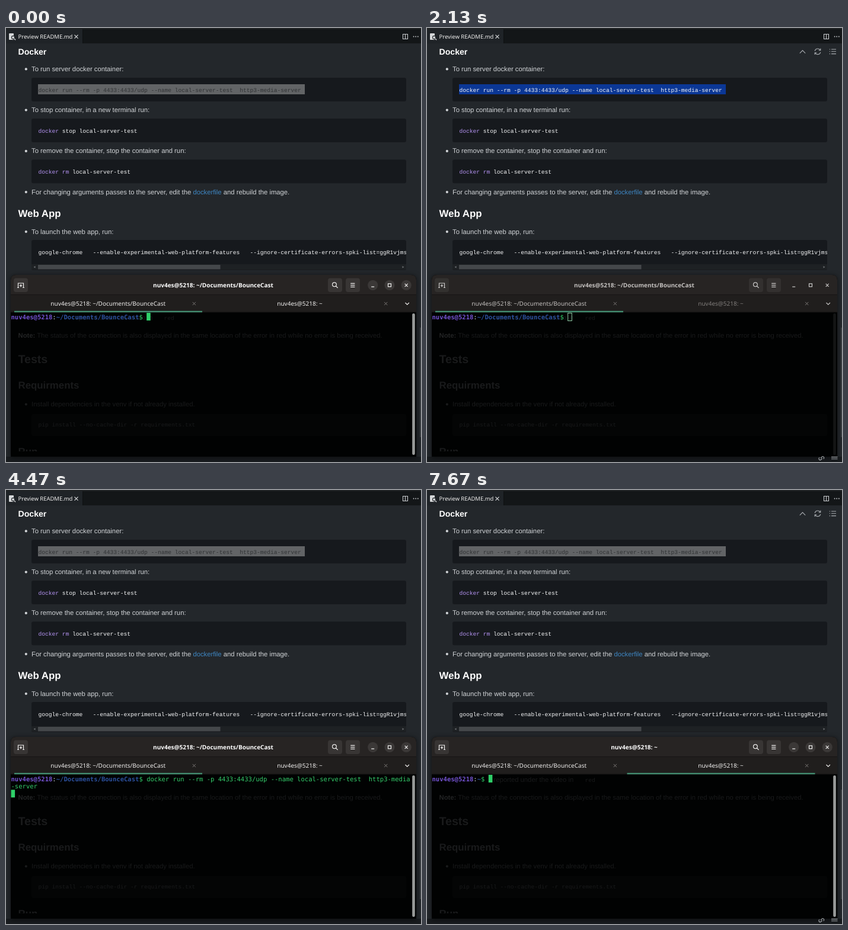
These frames come from a looping animation (700x733 px, 8 s). An HTML page:

```html
<!DOCTYPE html>
<html lang="en">
<head>
<meta charset="utf-8">
<title>Terminal over README preview</title>
<style>
  html, body { margin: 0; width: 100%; height: 100%; overflow: hidden; background: #23272b; }
  svg { display: block; width: 700px; height: 733px; }
  text { white-space: pre; text-rendering: geometricPrecision; }
  .body { font: 11.27px "Liberation Sans", Arial, sans-serif; fill: #d0d3d6; }
  .head { font: bold 16.85px "Liberation Sans", Arial, sans-serif; fill: #fff; }
  .code { font: 9.6px "Liberation Mono", monospace; fill: #f4f5f6; }
  .term { font: 10.55px "DejaVu Sans Mono", monospace; fill: #35cf6c; }
  .ui { font: 10.02px "Noto Sans", "Open Sans", sans-serif; fill: #efeeed; }
  .line { fill: none; stroke: #a9adb1; stroke-width: 1.1; }
  .ghost text { fill: #191a1b; }
</style>
</head>
<body>
<svg id="stage" viewBox="0 0 700 733"></svg>
<script>
const LOOP = 8000;
const USER = 'nuv4es@5218';
const PATH = '~/Documents/BounceCast';
const CODE_X = 54.5, CODE_W = 5.761;
const TERM_X = 8.5, TERM_W = 6.351;
const RUN = 'docker run --rm -p 4433:4433/udp --name local-server-test  http3-media-server';
const PURPLE = '#b392f0', BLUE = '#79b8ff', GREEN = '#2fd069';

const stage = document.getElementById('stage');

function el(tag, attrs, parent = stage, content) {
  const node = document.createElementNS('http://www.w3.org/2000/svg', tag);
  for (const key in attrs) node.setAttribute(key, attrs[key]);
  if (content !== undefined) node.textContent = content;
  parent.appendChild(node);
  return node;
}
const group = (parent, attrs = {}) => el('g', attrs, parent);
const rect = (x, y, width, height, fill, parent, rx = 0) =>
  el('rect', { x, y, width, height, fill, rx }, parent);
const text = (x, y, cls, content, parent, attrs = {}) =>
  el('text', { x, y, class: cls, ...attrs }, parent, content);
const path = (d, parent, attrs = {}) => el('path', { d, class: 'line', ...attrs }, parent);

// A text made of [content, colour, weight] runs.
function runs(x, y, cls, parts, parent) {
  const node = text(x, y, cls, '', parent);
  for (const [content, fill, weight] of parts) {
    const span = el('tspan', {}, node, content);
    if (fill) span.style.fill = fill;
    if (weight) span.style.fontWeight = weight;
  }
  return node;
}
const show = (node, on) => node.setAttribute('visibility', on ? 'visible' : 'hidden');
const within = (t, spans) => spans.some(([from, to]) => t >= from && t < to);

// Editor page
const defs = el('defs', {});
const clipRect = (id, x, y, w, h) => rect(x, y, w, h, '#000', el('clipPath', { id }, defs));
clipRect('codeClip', 43, 358, 632, 52);
clipRect('termClip', 8, 480, 682, 235);

const page = group(stage);
rect(0, 0, 700, 733, '#23272b', page);
rect(0, 0, 700, 26, '#131618', page);
rect(0, 2, 129, 24, '#1f2327', page);
rect(0, 0, 700, 2, '#1f2224', page);
rect(129, 2, 1, 24, '#0e1011', page);

rect(5, 9, 8, 11, '#d5d7d9', page, 1);
el('circle', { cx: 12, cy: 16, r: 2.6, fill: '#d5d7d9', stroke: '#25292d', 'stroke-width': 1.1 }, page);
path('M13.8 17.9L16 20.2', page, { style: 'stroke:#e5e7e9;stroke-width:1.3' });
text(20.5, 17.6, 'ui', 'Preview README.md', page, { style: 'font-size:9.45px' });
path('M115.5 11.6l6 6m0-6l-6 6', page, { style: 'stroke:#e0e2e4' });
path('M669.5 10.5h8v8h-8zM673.5 10.5v8', page, { style: 'stroke:#c8cbce' });
for (const cx of [687.6, 691.2, 694.8]) el('circle', { cx, cy: 14.5, r: 0.9, fill: '#c8cbce' }, page);

text(20.5, 45.3, 'head', 'Docker', page, { style: 'font-size:14.1px' });
text(20.5, 318.7, 'head', 'Web App', page);

function bullet(y, content, parent = page) {
  el('circle', { cx: 33.8, cy: y - 3.4, r: 2.1, fill: parent === page ? '#d0d3d6' : '#191a1b' }, parent);
  return text(43, y, 'body', content, parent);
}
bullet(72.8, 'To run server docker container:');
bullet(142, 'To stop container, in a new terminal run:');
bullet(211.3, 'To remove the container, stop the container and run:');
const note = bullet(280.5, 'For changing arguments passes to the server, edit the ');
el('tspan', { style: 'fill:#3e86c2' }, note, 'dockerfile');
el('tspan', {}, note, ' and rebuild the image.');
bullet(347.5, 'To launch the web app, run:');

for (const [y, h] of [[84, 40], [153, 40], [222.3, 40], [358, 51]]) rect(43, y, 632, h, '#16191d', page, 3);
runs(CODE_X, 176.8, 'code', [['docker', PURPLE], [' stop local-server-test']], page);
runs(CODE_X, 246, 'code', [['docker rm', PURPLE], [' local-server-test']], page);
text(CODE_X, 381.7, 'code',
  'google-chrome   --enable-experimental-web-platform-features   --ignore-certificate-errors-spki-list=ggR1vjmsq',
  page, { 'clip-path': 'url(#codeClip)' });
rect(43, 399, 632, 9.5, '#1e2124', page);
rect(54, 400, 307.5, 7.5, '#44474a', page);
path('M49.5 402l-3 1.8l3 1.8zM668.5 402l3 1.8l-3 1.8z', page, { style: 'fill:#6b6e71;stroke:none' });

// Selection in the first code block
const selection = rect(54, 95, 450, 17, '#0b3796', page);
const coloured = runs(CODE_X, 107.6, 'code', [
  ['docker', PURPLE], [' run '], ['--rm -p', BLUE], [' '], ['4433', BLUE], [':4433/udp '],
  ['--name', BLUE], [RUN.slice(39)]
], page);
const plain = text(CODE_X, 107.6, 'code', RUN, page);

rect(0, 724, 700, 9, '#181b1e', page);
rect(698, 506, 2, 185, '#3a3e42', page);

// Terminal window
const win = group(stage, { style: 'filter:drop-shadow(0 1px 4px rgba(0,0,0,.55))' });
path('M8 724V426q0-9 9-9H683q9 0 9 9V724z', win, { style: 'fill:#010202;stroke:none' });
path('M8 451V426q0-9 9-9H683q9 0 9 9V451z', win, { style: 'fill:#272423;stroke:none' });
rect(8, 450.5, 684, 29.5, '#201e1d', win);
rect(8, 450, 684, 1, '#161414', win);
rect(8, 479.5, 684, 1, '#121110', win);

const buttons = group(win);
for (const x of [13, 543, 573]) rect(x, 422.5, 24, 23.5, '#383534', buttons, 4);
const rounds = group(win);
for (const cx of [618.7, 647, 675.2]) el('circle', { cx, cy: 434.3, r: 8.6, fill: '#3b3837' }, rounds);
const marks = group(win);
const glyph = d => path(d, marks, { style: 'stroke:#f0efee;stroke-width:1.2' });
glyph('M20.5 438.5v-7.5h9v7.5M19 438.5h3M28 438.5h3M25 433v4.5M22.8 435.2h4.4');
glyph('M557.3 433.2a3.4 3.4 0 1 1-6.8 0a3.4 3.4 0 1 1 6.8 0M556.4 435.8l3.2 3.2');
glyph('M581.2 431.3h7.2M581.2 434.3h7.2M581.2 437.3h7.2');
glyph('M616.2 437.2h5M644.5 431.8h5v5h-5zM672.7 431.8l5 5m0-5l-5 5');
glyph('M673.5 464l3.2 3.2l3.2-3.2');

const middle = { 'text-anchor': 'middle' };
const title = text(349.5, 438, 'ui', '', win, { ...middle, style: 'font-weight:bold' });
const tabOne = text(172.2, 468.8, 'ui', `${USER}: ${PATH}`, win, middle);
const tabTwo = text(495.5, 468.8, 'ui', `${USER}: ~`, win, middle);
for (const x of [317.3, 640.7])
  path(`M${x - 2.6} 462.9l5.2 5.2m0-5.2l-5.2 5.2`, win, { style: 'stroke:#7d7a78;stroke-width:1' });
const underline = rect(14, 477.8, 317, 2.4, '#438d70', win);

// Page showing faintly through the terminal
const ghost = group(win, { class: 'ghost', 'clip-path': 'url(#termClip)' });
rect(43, 652, 632, 37, '#040505', ghost, 3);
const error = text(112.5, 492.6, 'body', 'reported under the video in ', ghost);
const red = text(266.5, 492.6, 'code', 'red', ghost);
runs(20.5, 522.6, 'body', [['Note:', '#232425', 'bold'],
  [' The status of the connection is also displayed in the same location of the error in red while no error is being received.']], ghost);
text(20.5, 565.8, 'head', 'Tests', ghost, { style: 'font-size:19.6px' });
text(20.5, 609.4, 'head', 'Requirments', ghost);
bullet(639, 'Install dependencies in the venv if not already installed.', ghost);
text(CODE_X, 672.8, 'code', 'pip install --no-cache-dir -r requirements.txt', ghost);
text(20.5, 720.5, 'head', 'Run', ghost);

// Terminal content
const prompt = place => runs(TERM_X, 491.6, 'term',
  [[USER, '#7453d2', 'bold'], [':', '#c9d3cf'], [place, '#2c519f', 'bold'], ['$', GREEN]], win);
const longPrompt = prompt(PATH);
const shortPrompt = prompt('~');
const CMD_X = TERM_X + 36 * TERM_W;
const marked = group(win);
rect(CMD_X, 481.3, 70 * TERM_W, 12.9, GREEN, marked);
rect(8.3, 494, 7 * TERM_W, 12.7, GREEN, marked);
const command = [
  text(CMD_X, 491.6, 'term', RUN.slice(0, 70), win),
  text(TERM_X, 504.1, 'term', RUN.slice(70), win)
];
const cursor = rect(0, 481, 6.6, 13, GREEN, win);
const scrollbar = rect(685.2, 482, 4.6, 239, '#999b9a', win, 2.3);

// Hover controls of the preview
const tools = group(stage);
path('M628.8 42.6l4.7-4.8l4.7 4.8', tools);
path('M654.2 38.8a5 5 0 0 1 9-1.6M663.8 34.6v3.2h-3.2M663.8 40.8a5 5 0 0 1-9 1.6M654.2 45v-3.2h3.2', tools);
path('M682 36h8M682 39.8h8M682 43.6h8M678.8 36h1.3M678.8 39.8h1.3M678.8 43.6h1.3', tools);
path('M662 725.2l-.6.8a2.2 2.2 0 0 0 3.2 3l2-2M664 726.5l2.4-2.4a2.2 2.2 0 0 1 3 3l-.8.8', tools);
path('M682 724.6h10.5M682 727.8h10.5', tools);

const PICK = { x: CODE_X + 52 * CODE_W, w: CODE_W };
const HOVER = [[470, 2800], [7070, LOOP]];
const BLINK_OFF = [[670, 1270], [4730, 5330], [5930, 6470], [7070, 7670]];

function draw(t) {
  const focused = !within(t, [[1400, 3000]]);
  const second = t >= 6470;
  const pasted = within(t, [[3470, 6470]]);
  const lit = within(t, [[3470, 4130]]);

  // Selection: grey when inactive, then cleared, one mark, whole line
  const grey = !within(t, [[1470, 3065]]);
  const cleared = within(t, [[1470, 1670]]);
  const one = within(t, [[1670, 1730]]);
  show(selection, !cleared);
  selection.setAttribute('x', one ? PICK.x : 54);
  selection.setAttribute('width', one ? PICK.w : 450);
  selection.setAttribute('fill', grey ? '#626466' : '#0b3796');
  show(coloured, cleared || one);
  show(plain, !(cleared || one));
  plain.style.fill = grey ? '#303234' : '#f4f5f6';

  show(tools, within(t, HOVER));

  title.textContent = second ? `${USER}: ~` : `${USER}: ${PATH}`;
  title.style.fill = focused ? '#fff' : '#c3c0be';
  tabOne.style.fill = focused ? '#efeeed' : '#c3c0be';
  tabTwo.style.fill = focused ? '#efeeed' : '#7f7c7a';
  buttons.setAttribute('opacity', focused ? 1 : 0.75);
  marks.setAttribute('opacity', focused ? 1 : 0.8);
  show(rounds, focused);
  scrollbar.setAttribute('fill', focused ? '#999b9a' : '#141515');
  underline.setAttribute('x', second ? 337.5 : 14);

  show(longPrompt, !second);
  show(shortPrompt, second);
  show(error, !pasted);
  show(red, !pasted);
  show(marked, lit);
  for (const line of command) {
    show(line, pasted);
    line.style.fill = lit ? '#07210f' : '#35cf6c';
  }

  const col = second ? 15 : pasted ? 0 : 36;
  const inset = focused ? 0 : 0.5;
  cursor.setAttribute('x', TERM_X + col * TERM_W + inset);
  cursor.setAttribute('y', (pasted ? 506.3 : 481) + inset);
  cursor.setAttribute('fill', focused ? GREEN : 'none');
  cursor.setAttribute('stroke', focused ? 'none' : '#8fcda6');
  show(cursor, !within(t, BLINK_OFF));
}

const start = performance.now();
function tick() {
  draw((performance.now() - start) % LOOP);
  requestAnimationFrame(tick);
}
draw(0);
requestAnimationFrame(tick);
</script>
</body>
</html>
```
